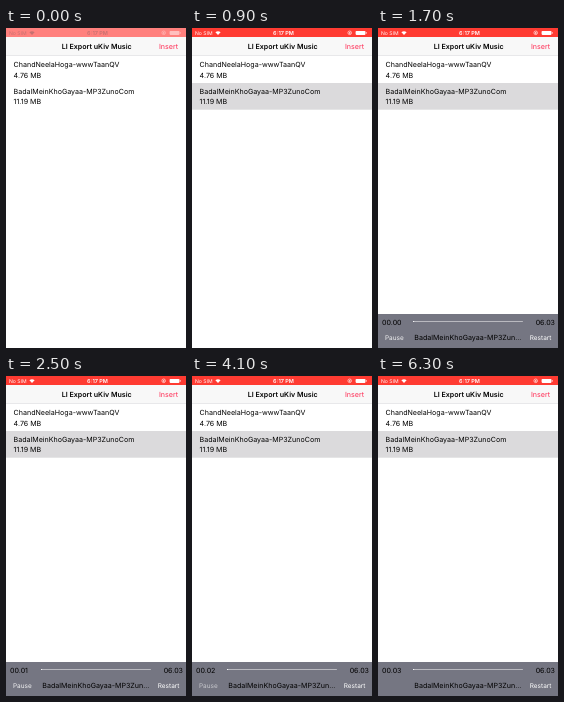
An HTML page for the animation above (6400 ms loop, 180x320 px).

```html
<!DOCTYPE html>
<html lang="en">
<head>
<meta charset="utf-8">
<title>Music export</title>
<style>
  html, body { margin: 0; width: 100%; height: 100%; overflow: hidden; background: #fff; }
  svg { display: block; width: 100vw; height: 100vh; }
  text { font: 400 7.1px Inter, Roboto, sans-serif; text-rendering: geometricPrecision; white-space: pre; }
  .title { font-weight: 600; }
  .tint { fill: #ff2d55; }
  .button { font-size: 6.45px; fill: #fff; }
  .status { font-size: 5.1px; }
  .clock { font-size: 5.5px; font-weight: 600; }
  .mid { text-anchor: middle; }
  .end { text-anchor: end; }
</style>
</head>
<body>
<svg viewBox="0 0 180 320">
  <rect width="180" height="320" fill="#fff"/>

  <rect y="9" width="180" height="18.6" fill="#f8f8f8"/>
  <rect y="27.4" width="180" height=".5" fill="#d5d5d8"/>
  <text class="title mid" x="90.7" y="21.4">LI Export uKiv Music</text>
  <text class="tint end" x="172" y="21.4">Insert</text>

  <rect id="bar" width="180" height="9"/>
  <g id="status">
    <text class="status" x="3" y="6.9">No SIM</text>
    <text class="clock mid" x="91.5" y="7">6:17 PM</text>
    <path d="M26 7.1 L23.4 4.2 Q26 2.2 28.6 4.2 Z"/>
  </g>
  <g id="icons" fill="#fff">
    <circle cx="157.7" cy="4.8" r="1.8" fill="none" stroke="#fff" stroke-width=".6"/>
    <rect x="157" y="4.3" width="1.4" height="1.3"/>
    <rect x="163.6" y="2.9" width="9.9" height="4" rx=".8"/>
    <rect x="174.3" y="4.1" width=".6" height="1.6"/>
  </g>

  <rect id="row" y="55" width="180" height="26.7" fill="#dbdadc"/>
  <text x="7.6" y="39.2">ChandNeelaHoga-wwwTaanQV</text>
  <text x="7.6" y="49.7">4.76 MB</text>
  <text x="7.6" y="65.9">BadalMeinKhoGayaa-MP3ZunoCom</text>
  <text x="7.6" y="76.4">11.19 MB</text>

  <g id="player">
    <rect y="286" width="180" height="34" fill="#757682"/>
    <rect x="35" y="293" width="110" height="1" rx=".5" fill="#b9b9bf"/>
    <rect id="played" x="35" y="293" height="1" rx=".5" fill="#fff"/>
    <text id="elapsed" x="4" y="296.5"></text>
    <text id="total" class="end" x="177" y="296.5"></text>
    <text id="toggle" class="button" x="7" y="311.8"></text>
    <text x="36.3" y="312">BadalMeinKhoGayaa-MP3Zun...</text>
    <text class="button end" x="173.4" y="311.8">Restart</text>
  </g>
</svg>
<script>
const LOOP = 6400, STEP = 100, TAP = 900, OPEN = 1000, READY = 1400;
const $ = id => document.getElementById(id);

// [start ms, label]
const elapsedSteps = [[0, "00:00"], [READY, "00.00"], [2400, "00.01"], [3400, "00.02"], [4500, "00.03"]];

// The toggle fades its new label in: [start ms, label, fade ms]
const toggleSteps = [
  [0, "", 0], [900, "Pause", 350], [3000, "Play", 400],
  [3900, "Pause", 300], [5500, "Play", 400], [6300, "Pause", 300]
];

const at = (steps, t) => steps.findLast(s => s[0] <= t);
const blend = (a, b, k) => `rgb(${a.map((v, i) => Math.round(v + (b[i] - v) * k))})`;
const show = (id, on) => $(id).setAttribute("visibility", on ? "visible" : "hidden");

function draw(t) {
  const wake = Math.min(t / 400, 1);
  $("bar").setAttribute("fill", blend([255, 128, 125], [255, 59, 50], wake));
  $("status").setAttribute("fill", blend([198, 112, 112], [255, 255, 255], wake));
  $("icons").setAttribute("opacity", .5 + wake / 2);

  show("row", t >= TAP);
  show("player", t >= OPEN);

  $("elapsed").textContent = at(elapsedSteps, t)[1];
  $("total").textContent = t < READY ? "00:00" : "06.03";
  $("played").setAttribute("width", t < READY ? 0 : 1.2);

  const [from, label, fade] = at(toggleSteps, t);
  $("toggle").textContent = label;
  $("toggle").setAttribute("opacity", fade ? .9 * Math.min((t - from) / fade, 1) : 0);
}

const start = performance.now();
function tick() {
  const t = (performance.now() - start) % LOOP;
  draw(Math.floor(t / STEP) * STEP);
  requestAnimationFrame(tick);
}
tick();
</script>
</body>
</html>
```
